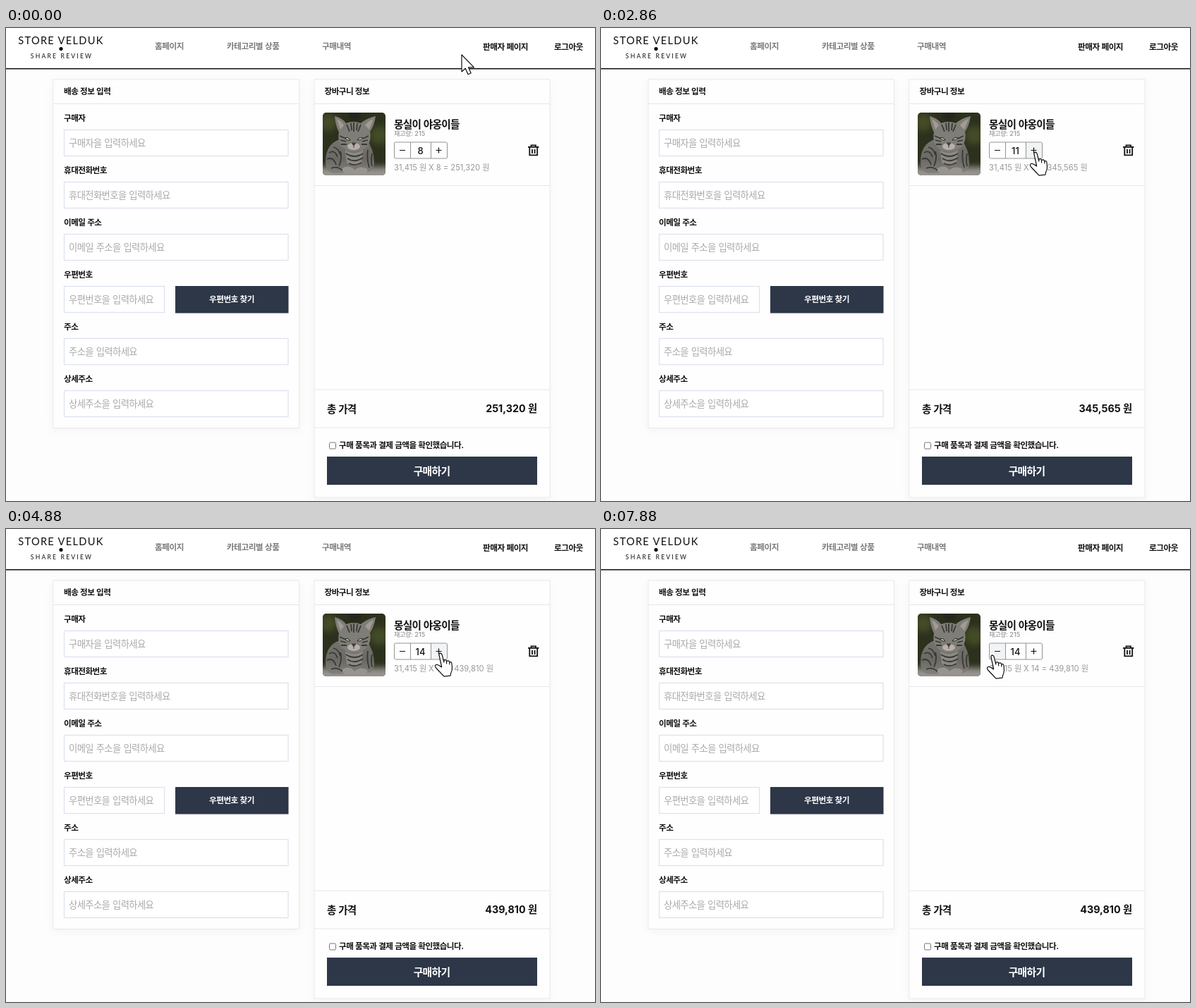
An HTML page that plays this animation: 835x671 px, repeating every 8000 ms.

```html
<!DOCTYPE html>
<html lang="ko">
<head>
<meta charset="utf-8">
<title>Cart</title>
<style>
  html, body { margin: 0; width: 100%; height: 100%; overflow: hidden; background: #fdfdfd; }
  svg { display: block; width: 100vw; height: 100vh; }
  text { font-family: Inter, "Noto Sans CJK KR", sans-serif; white-space: pre; }
  .hangul { letter-spacing: -.046em; }
  .bold { font-weight: 700; }
  .logo { font-family: Lato, sans-serif; }
  .card { fill: #fefefe; stroke: #e9e9ec; filter: drop-shadow(0 3px 6px rgba(0, 0, 0, .04)); }
  .rule { stroke: #e6e6ea; }
  .field { fill: #fff; stroke: #dde2ee; stroke-width: 1.3; }
  .dark { fill: #2d3748; }
  .line { fill: none; stroke: #111; }
  .tag { font: 6.1px "Liberation Mono", monospace; }
  .pointer { fill: #fff; stroke: #111; stroke-width: 1.2; stroke-linejoin: round; }
</style>
</head>
<body>
<svg id="stage" viewBox="0 0 835 671">
  <defs>
    <clipPath id="photoClip"><rect width="89" height="89" rx="5"/></clipPath>
    <filter id="soft"><feGaussianBlur stdDeviation="4"/></filter>
    <filter id="fur"><feGaussianBlur stdDeviation=".7"/></filter>
    <linearGradient id="coat" x2="0" y2="1">
      <stop stop-color="#75736d"/><stop offset=".6" stop-color="#6b6964"/><stop offset="1" stop-color="#83817c"/>
    </linearGradient>
  </defs>

  <g id="page"></g>

  <g transform="translate(449 120)" clip-path="url(#photoClip)">
    <rect width="89" height="89" fill="#2c311d"/>
    <g filter="url(#soft)">
      <circle cx="8" cy="14" r="12" fill="#454b26"/>
      <circle cx="80" cy="32" r="13" fill="#434b27"/>
      <circle cx="45" cy="2" r="10" fill="#20241a"/>
      <rect x="-9" y="77" width="107" height="25" fill="#96938f"/>
    </g>
    <g filter="url(#fur)">
      <path d="M4 70Q4 45 24 38H62Q73 52 73 72Q72 85 57 85L15 86Q4 84 4 70Z" fill="url(#coat)"/>
      <path d="M17 5Q28 8 33 15Q44 11 54 15Q62 8 75 5Q73 19 67 27Q70 43 59 51Q44 60 30 51Q20 43 23 28Q18 18 17 5Z" fill="#7f7d77"/>
      <path d="M20 9Q27 13 30 18L25 24ZM72 9Q64 12 60 18L66 24Z" fill="#a39a94"/>
      <path d="M32 53Q44 61 57 53L55 72Q44 80 34 71Z" fill="#8b8984"/>
      <path d="M34 17L38 27M40 15L41 25M44 14V27M49 15L48 25M54 17L50 27M24 33L33 37M65 33L57 37M25 39L33 41M64 39L56 41M26 45L34 45M63 45L55 45M9 57Q17 52 21 63M15 49Q23 51 25 60M6 66Q15 62 19 74M25 55Q28 65 23 76M33 58Q45 66 57 58M35 65Q45 72 57 64M37 72Q45 77 55 71M64 53Q62 66 66 78M70 58Q68 68 70 76M12 79Q20 75 28 82"
        fill="none" stroke="#393834" stroke-width="1.8"/>
      <ellipse cx="44" cy="48" rx="9" ry="5" fill="#b5b1aa"/>
      <path d="M32 36Q36 34 39 39Q34 40 32 36ZM57 36Q52 34 49 39Q54 40 57 36Z" fill="#b9b99b" stroke="#24231f"/>
      <path d="M41 43H47L44 47ZM44 47V50" fill="#4b3a38" stroke="#4b3a38"/>
      <path d="M28 79Q39 73 45 82Q53 74 63 80Q65 87 54 86H33Q27 86 28 79Z" fill="#98958f"/>
    </g>
  </g>

  <g id="stepper">
    <rect id="minusHover" x="551" y="163" width="22" height="22" fill="#f1f4f4"/>
    <rect id="plusHover" x="603" y="163" width="22" height="22" fill="#f1f4f4"/>
    <g class="line">
      <rect x="550.5" y="162" width="75" height="23" rx="2" stroke="#949494"/>
      <path d="M573.5 162V185M602.5 162V185" stroke="#949494"/>
      <path d="M558 173.5H566M609.5 173.5H617.5M613.5 169.5V177.5" stroke-width="1.2"/>
    </g>
  </g>
  <path class="line" stroke-width="1.8" d="M740 168.8H755.5M744.5 168V166.3H751V168M742.3 169V180.3H753.2V169M746 172V178M749.6 172V178"/>

  <g id="values"></g>
  <g id="overlays"></g>
  <path id="arrow" class="pointer" d="M0 0V24L5.3 19.2L9 27.8L13.2 26L9.5 17.8H17.5Z"/>
  <path id="hand" class="pointer" d="M10.5 21L7 5Q6.6 2.4 8.8 2.2Q10.6 2.2 11.2 4.5L13.8 15V12.5Q16 10.5 17.6 13V17V13.8Q20 11.5 21.8 14.5V18V15.3Q24.5 13.5 25 17L25.5 23Q25.5 27.5 23.5 31L23 34.2L14 35.2L11.5 32.5L2.5 23Q0 19.5 3 18.5Q5 18 10.5 22Z"/>
  <g id="beam" fill="none">
    <path d="M-7 -13H-2L0 -11L2 -13H7M0 -11V11M-7 13H-2L0 11L2 13H7" stroke="#fff" stroke-width="4"/>
    <path d="M-7 -13H-2L0 -11L2 -13H7M0 -11V11M-7 13H-2L0 11L2 13H7" stroke="#111" stroke-width="2.2"/>
  </g>
</svg>
<script>
const LOOP = 8000, PRICE = 31415;
const $ = id => document.getElementById(id);

// Text is placed by its vertical middle.
function label(x, y, size, text, { cls = 'bold', fill = '#111', anchor = 'start' } = {}) {
  const runs = text.replace(/[가-힣]+/g, '<tspan class="hangul">$&</tspan>');
  return `<text x="${x}" y="${y + size * .38}" font-size="${size}" class="${cls}" fill="${fill}" text-anchor="${anchor}">${runs}</text>`;
}
const box = (x, y, right, bottom, cls) =>
  `<rect x="${x}" y="${y}" width="${right - x}" height="${bottom - y}" class="${cls}"/>`;
const rule = (x, right, y) => `<path class="rule" d="M${x} ${y}H${right}"/>`;

function drawPage() {
  const white = { fill: '#fff', anchor: 'middle' };
  const nav = { cls: '', fill: '#7c7c7c' };
  const hint = { cls: '', fill: '#a9a9a9' };
  const logo = { cls: 'logo', anchor: 'middle' };
  const fields = ['구매자', '휴대전화번호', '이메일 주소', '우편번호', '주소', '상세주소'];
  const form = fields.map((name, i) => {
    const y = 144.5 + 74 * i;
    return label(82, y - 16.5, 11.6, name) +
      box(82.5, y, i === 3 ? 224.5 : 400, y + 37, 'field') +
      label(89, y + 18.5, 13.33, name + '을 입력하세요', hint);
  }).join('');

  $('page').innerHTML = [
    '<rect width="835" height="57" fill="#fff"/>',
    '<path class="line" stroke-width="1.4" d="M0 57.7H835"/>',
    `<g letter-spacing="1.3">${label(78, 17.5, 14.6, 'STORE VELDUK', logo)}</g>`,
    '<circle cx="78" cy="29.5" r="2.6"/>',
    `<g letter-spacing="2.2">${label(79, 39.5, 8.6, 'SHARE REVIEW', logo)}</g>`,
    '<g font-weight="600">',
    label(211, 26, 11.7, '홈페이지', nav),
    label(313, 26, 11.7, '카테고리별 상품', nav),
    label(448, 26, 11.7, '구매내역', nav),
    '</g>',
    label(676, 27, 11.7, '판매자 페이지'),
    label(777, 27, 11.7, '로그아웃'),
    box(67, 73, 415.5, 567.5, 'card'), rule(67, 415, 107.5),
    label(82, 90, 11.6, '배송 정보 입력'),
    form,
    box(240, 366, 400.5, 404.5, 'dark'),
    label(320, 385, 11.7, '우편번호 찾기', white),
    box(437, 73, 771, 666, 'card'),
    [107.5, 223.5, 513, 567].map(y => rule(437, 771, y)).join(''),
    label(451.5, 90, 11.6, '장바구니 정보'),
    label(550, 136, 14.6, '몽실이 야옹이들'),
    label(550, 150, 9.2, '재고량: 215', { cls: '', fill: '#888' }),
    label(455, 540, 14.5, '총 가격'),
    '<rect x="458.5" y="588" width="9" height="9" rx="1.5" fill="#fff" stroke="#777"/>',
    label(472, 592, 11.6, '구매 품목과 결제 금액을 확인했습니다.'),
    box(455, 608, 753, 648, 'dark'),
    label(603.5, 628.5, 14.8, '구매하기', white)
  ].join('');
}

function drawValues(quantity) {
  const total = (PRICE * quantity).toLocaleString('en-US') + ' 원';
  $('values').innerHTML =
    `<g font-weight="500">${label(587.5, 174, 13, String(quantity), { cls: '', anchor: 'middle' })}</g>` +
    label(550, 197.5, 11.2, `${PRICE.toLocaleString('en-US')} 원 X ${quantity} = ${total}`, { cls: '', fill: '#999' }) +
    label(752.5, 540, 14.3, total, { anchor: 'end' });
}

// Render highlights: left, top, right, bottom, component names.
const headerMarks = [
  [11, 5, 144, 49, 'div'], [180, 5, 634, 48, 'nav ul'], [180, 5, 520, 48, ''],
  [211, 11, 253, 43, 'Link'], [313, 11, 388, 43, 'Link'], [448, 11, 489, 43, 'Link'],
  [670, 5, 825, 55, 'div'], [670, 15, 746, 38, 'Link'], [770, 14, 825, 40, 'button'],
  [-2, -2, 837, 58, '']
];
const formMarks = [
  [67, 73, 770, 665, 'div div div'], [67, 73, 414, 567, ''], [67, 108, 414, 567, 'form'],
  ...Array.from({ length: 6 }, (_, i) => [82, 123 + 74 * i, 400, 182 + 74 * i, i === 3 ? 'div div' : 'div']),
  [82, 345, 224, 404, ''], [240, 366, 400, 404, 'button']
];
const cartMarks = [
  [437, 73, 770, 665, 'div div'], [437, 108, 770, 222, 'div div'], [449, 120, 538, 209, 'picture'],
  [549, 120, 758, 210, 'div'], [549, 127, 758, 144, 'div h4'], [549, 144, 758, 154, ''],
  [549, 162, 758, 185, ''], [552, 162, 573, 185, 'div'], [602, 162, 625, 185, 'button'],
  [556, 167, 568, 181, 'Context.Consumer'], [607, 167, 620, 181, 'Context.Consumer'],
  [737, 164, 758, 184, 'Context.Consumer'], [549, 192, 758, 206, 'div'],
  [437, 222, 770, 223, 'hr'], [437, 513, 770, 567, 'div'],
  [455, 531, 497, 549, 'h4'], [681, 531, 752, 549, 'h4'], [437, 567, 770, 665, 'div'],
  [455, 585, 752, 598, 'div div'], [455, 608, 752, 648, 'button']
];
const markColors = ['#37afa9', '#63b19e', '#7ab190'];

function overlay(color, i) {
  const count = i ? ` x${i + 1}` : '';
  const marks = [...headerMarks, ...formMarks, ...cartMarks];
  const outlines = marks.map(([x, y, right, bottom]) => box(x, y, right, bottom, ''));
  const tags = marks.filter(mark => mark[4]).map(([x, y, , , names]) => {
    const text = names.split(' ').map(n => (/^[A-Z]/.test(n) ? n : 'styled.' + n) + count).join(', ');
    return `<rect x="${x}" y="${y - 10}" width="${text.length * 3.66 + 3}" height="9.3" fill="${color}"/>` +
      `<text class="tag" x="${x + 1.5}" y="${y - 3.4}">${text}</text>`;
  });
  return `<g display="none"><g fill="none" stroke="${color}" stroke-width=".9">${outlines.join('')}</g>${tags.join('')}</g>`;
}

// Click start, last render, highlight cleared, resulting quantity.
const clicks = [
  [1420, 1530, 1830, 9], [1930, 1930, 2230, 10], [2430, 2530, 2860, 11], [3260, 3340, 3640, 12],
  [3860, 3940, 4140, 13], [4440, 4560, 4880, 14], [5160, 5370, 5560, 15], [7380, 7480, 7700, 14]
];
const approach = Array.from({ length: 8 }, (_, i) => {
  const p = (i + 1) / 9;
  return [120 + i * 98.75, 'arrow', 646 + 50 * p - 82 * p * p, 38 + 137 * p];
});
const pointerSteps = [
  [0, 'arrow', 646, 38], ...approach,
  [910, 'hand', 608, 172], [1010, 'hand', 607, 174],
  [6870, 'beam', 616, 193], [6980, 'beam', 586, 195],
  [7090, 'hand', 541, 173], [7880, 'hand', 546, 177]
];

const show = (node, on) => node.setAttribute('display', on ? 'inline' : 'none');
let shownQuantity;

function render(t) {
  const done = clicks.filter(c => t >= c[1]).pop();
  const quantity = done ? done[3] : 8;
  if (quantity !== shownQuantity) drawValues(shownQuantity = quantity);

  const active = clicks.find(([start, , clear]) => t >= start && t < clear);
  const renders = !active ? 0 : t >= active[1] ? 3 : t - active[0] >= 120 ? 2 : 1;
  [...$('overlays').children].forEach((group, i) => show(group, i + 1 === renders));

  const [, kind, x, y] = pointerSteps.filter(step => t >= step[0]).pop();
  for (const id of ['arrow', 'hand', 'beam']) show($(id), id === kind);
  $(kind).setAttribute('transform', `translate(${x} ${y})`);
  show($('plusHover'), kind === 'hand' && x > 600);
  show($('minusHover'), kind === 'hand' && x < 600);
}

drawPage();
$('overlays').innerHTML = markColors.map(overlay).join('');
const begin = performance.now();
function tick() {
  render((performance.now() - begin) % LOOP);
  requestAnimationFrame(tick);
}
tick();
</script>
</body>
</html>
```
